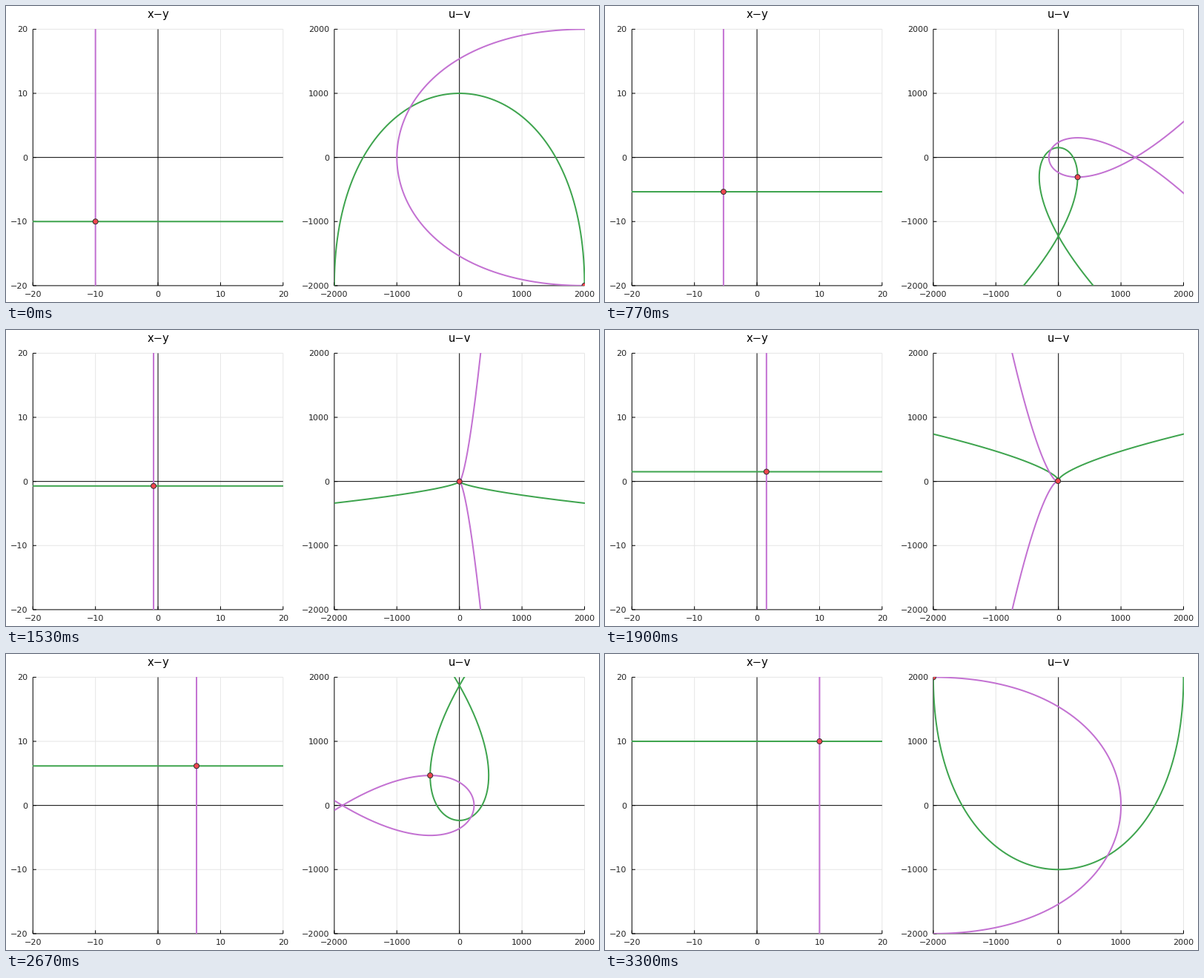
A matplotlib script that plays this animation: 800x400 px, repeating every 3330 ms.

```python
import numpy as np
import matplotlib.pyplot as plt
from matplotlib.animation import FuncAnimation
from matplotlib.collections import LineCollection
from matplotlib.patches import Ellipse

W, H, DPI = 800, 400, 100
PX = 72 / DPI
STEPS = 100
TICKS, TICK_MS = 333, 10
GREEN, PURPLE, RED = "#3ea44e", "#c371d2", "#f0464f"
TOP, BOTTOM = 31.4, 377.9

plt.rcParams["font.family"] = "DejaVu Sans"
fig = plt.figure(figsize=(W / DPI, H / DPI), dpi=DPI, facecolor="white")
stage = fig.add_axes([0, 0, 1, 1])
stage.set(xlim=(0, W), ylim=(H, 0))
stage.axis("off")


def rules(segments, color):
    stage.add_collection(LineCollection(
        segments, colors=color, linewidths=PX, capstyle="butt", snap=False),
        autolim=False)


def write(text, x, base, size, align="center", color="#222222"):
    stage.text(x, base, text.replace("-", "\u2212"), fontsize=size,
               ha=align, va="baseline", color=color)


def panel(left, right, limit, title):
    """Draw one coordinate plane and return its moving parts."""
    width, height = right - left, BOTTOM - TOP
    grid, black = [], []
    for i in range(5):
        x = left + width * i / 4
        y = BOTTOM - height * i / 4
        lines = [[(x, TOP), (x, BOTTOM)], [(left, y), (right, y)]]
        (black if i in (0, 2) else grid).extend(lines)
        black += [[(x, BOTTOM), (x, BOTTOM - 4.5)], [(left, y), (left + 4.5, y)]]
        label = str(limit * (i - 2) // 2)
        write(label, x, 393, 8)
        write(label, left - 6.8, y + 4, 8, "right")
    rules(grid, "#e6e6e6")
    rules(black, "black")
    write(title, (left + right) / 2, 16, 10.6, color="black")

    ax = fig.add_axes([left / W, 1 - BOTTOM / H, width / W, height / H])
    ax.set(xlim=(-limit, limit), ylim=(-limit, limit))
    ax.axis("off")
    green, = ax.plot([], [], color=GREEN, lw=2 * PX, snap=False)
    purple, = ax.plot([], [], color=PURPLE, lw=2 * PX, snap=False)
    unit = 2 * limit
    dot = Ellipse((0, 0), 7 * unit / width, 7 * unit / height, fc=RED,
                  ec="#333333", lw=PX, zorder=5, snap=False)
    ax.add_patch(dot)
    return green, purple, dot


plane = panel(36.3, 373.8, 20, "x-y")
image = panel(442.9, 780.5, 2000, "u-v")
span = np.linspace(-20, 20, 401)


def place(parts, horizontal, vertical, point):
    green, purple, dot = parts
    green.set_data(horizontal.real, horizontal.imag)
    purple.set_data(vertical.real, vertical.imag)
    dot.set_center((point.real, point.imag))


def draw(tick):
    # Steps begin on the nearest multiple of 10 ms.
    step = int((tick + 0.5) * STEPS / TICKS)
    c = -10 + 20 * step / (STEPS - 1)
    shapes = span + 1j * c, c + 1j * span, c + 1j * c
    place(plane, *shapes)
    place(image, *(z ** 3 for z in shapes))
    return plane + image


anim = FuncAnimation(fig, draw, frames=TICKS, interval=TICK_MS,
                     repeat=True, repeat_delay=0, blit=False)
plt.show()
```
